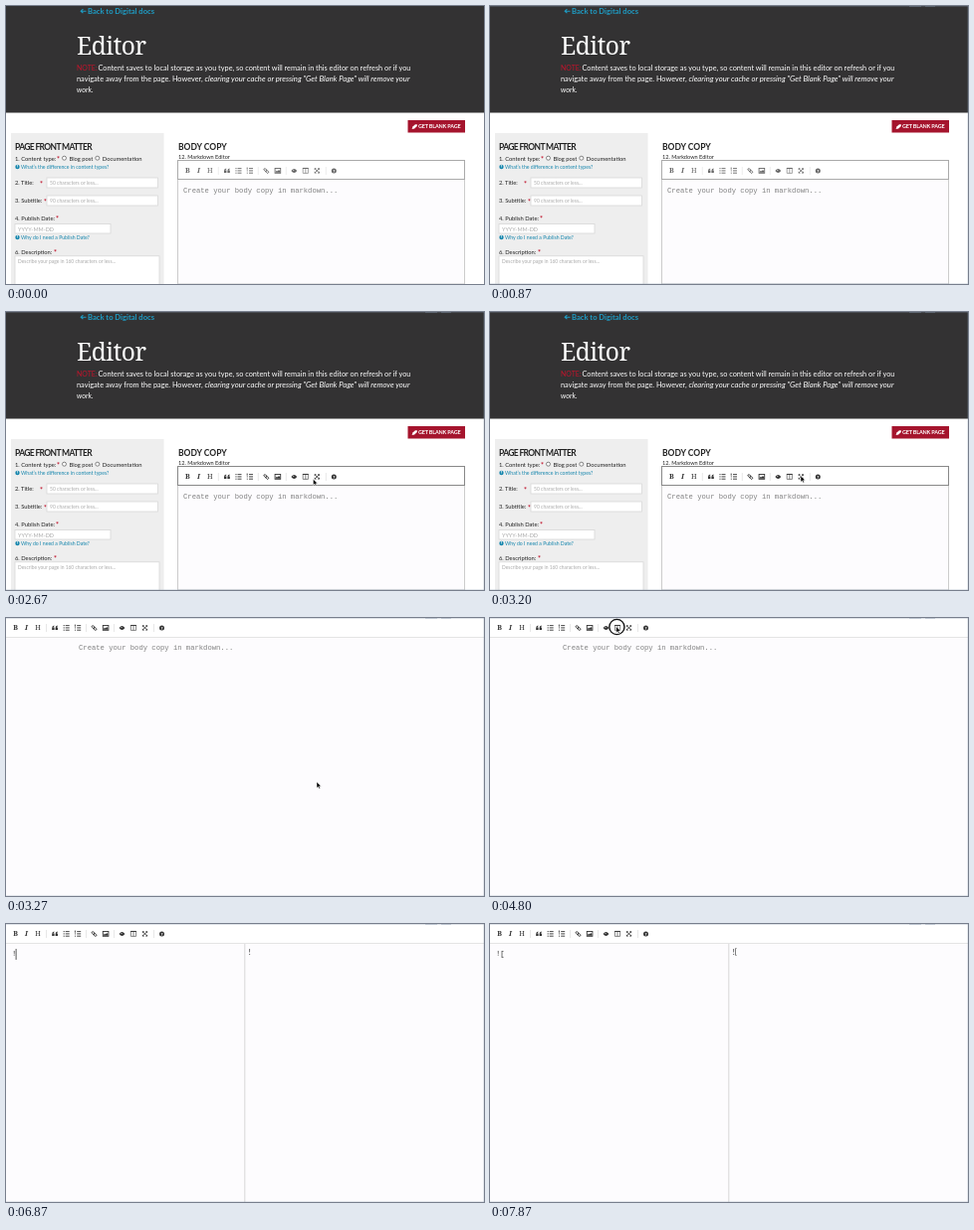
An HTML page for the animation above (8 s loop, 480 px wide and 280 px high).

```html
<!DOCTYPE html>
<html lang="en">
<head>
<meta charset="utf-8">
<title>Markdown editor</title>
<style>
html, body { margin: 0; width: 100%; height: 100%; overflow: hidden; background: #fff; }
svg { display: block; width: 480px; height: 280px; }
text { font-family: Lato, "Open Sans", sans-serif; white-space: pre; }
.mono { font: 7.19px "Liberation Mono", "DejaVu Sans Mono", monospace; fill: #808080; }
.label { font-size: 5.8px; fill: #222; }
.hint { font-size: 5px; fill: #aaa; }
.help { font-size: 5.15px; fill: #1686ad; }
.star { font-size: 7px; font-weight: 700; fill: #c0142c; }
.lead { font-size: 7.34px; fill: #fff; }
.field { fill: #fff; stroke: #d8d8d8; stroke-width: .8; }
.line { fill: none; stroke: #333; stroke-width: .9; }
.serif { font-family: "Noto Serif", "DejaVu Serif", serif; }
</style>
</head>
<body>
<svg viewBox="0 0 480 280">
  <defs>
    <g id="tools" fill="#333">
      <text class="serif" x="9.5" y="12.4" font-size="7" font-weight="700" text-anchor="middle">B</text>
      <text class="serif" x="20.5" y="12.4" font-size="7" font-style="italic" font-weight="600" text-anchor="middle">I</text>
      <text class="serif" x="32" y="12.4" font-size="7" text-anchor="middle">H</text>
      <path d="M46.2 10.2Q46.2 7.6 48.4 7.4V8.4Q47.4 8.7 47.4 9.6H48.6V12H46.2ZM49.6 10.2Q49.6 7.6 51.8 7.4V8.4Q50.8 8.7 50.8 9.6H52V12H49.6Z"/>
      <path class="line" d="M57.6 7.6h1.2M57.6 9.9h1.2M57.6 12.2h1.2M59.7 7.6h4M59.7 9.9h4M59.7 12.2h4"/>
      <path class="line" d="M69.4 6.6v2M69 9.9h1M69 12.2h1M71.2 7.6h4M71.2 9.9h4M71.2 12.2h4"/>
      <g transform="rotate(45 88.5 10)" class="line">
        <rect x="85.6" y="9" width="3.2" height="2" rx="1"/>
        <rect x="88.2" y="9" width="3.2" height="2" rx="1"/>
      </g>
      <rect class="line" x="97.3" y="7.5" width="5.6" height="4.8"/>
      <path d="M98 11.8V10.8L99.2 9.8 99.9 10.4 101.2 8.9 102.3 10.2V11.8Z"/>
      <path d="M113.6 10Q116.5 5.8 119.4 10Q116.5 14.2 113.6 10Z"/>
      <circle cx="116" cy="9.5" r=".5" fill="#fff"/>
      <path d="M125.4 7.4h5.2v5h-5.2zM128 7.4v5" fill="none" stroke="#555" stroke-width=".7"/>
      <path class="line" d="M125.1 7.5h5.8"/>
      <path class="line" d="M137.6 8L141.4 11.8M141.4 8L137.6 11.8"/>
      <path d="M136.9 7.2h2.1l-2.1 2.1zM142.1 7.2v2.1l-2.1-2.1zM136.9 12.6v-2.1l2.1 2.1zM142.1 12.6h-2.1l2.1-2.1z"/>
      <circle cx="156.5" cy="10" r="2.5"/>
      <text x="156.5" y="11.6" font-size="4.4" font-weight="900" fill="#fff" text-anchor="middle">?</text>
      <path d="M40.5 6v8M80.5 6v8M108.5 6v8M148.5 6v8" stroke="#ddd" stroke-width=".7"/>
    </g>
  </defs>

  <g id="page">
    <rect width="480" height="280" fill="#fff"/>
    <rect width="480" height="107.5" fill="#333233"/>
    <path d="M80.5 5.2H75.4M77.4 3.2L75.2 5.2 77.4 7.2" fill="none" stroke="#1f9cc4" stroke-width="1.1"/>
    <text x="82" y="7.7" font-size="7.6" font-weight="700" fill="#1f9cc4">Back to Digital docs</text>
    <text class="serif" x="71" y="49" font-size="24.5" font-weight="300" letter-spacing="-.5" fill="#fff">Editor</text>
    <text x="71" y="65.3" font-size="7" fill="#c0142c">NOTE:</text>
    <text class="lead" x="92.5" y="65.3">Content saves to local storage as you type, so content will remain in this editor on refresh or if you</text>
    <text class="lead" x="71" y="75.9">navigate away from the page. However, <tspan font-style="italic" font-size="7.7">clearing your cache or pressing "Get Blank Page" will remove your</tspan></text>
    <text class="lead" x="71" y="86.7" font-style="italic">work.</text>

    <rect x="403.5" y="115" width="57.5" height="12.5" fill="#a5142d"/>
    <path d="M407.6 124L408.4 121.6 411 119.2H412.8V121L410.2 123.4Z" fill="#fff"/>
    <text x="414" y="123.3" font-size="5.5" font-weight="700" letter-spacing="-.2" fill="#fff">GET BLANK PAGE</text>

    <rect x="5" y="128" width="153.5" height="152" fill="#eee"/>
    <text x="9" y="144.6" font-size="8.5" font-weight="700" letter-spacing="-.65" fill="#222">PAGE FRONT MATTER</text>
    <g id="form"></g>

    <text x="173" y="144.6" font-size="8.5" font-weight="700" fill="#222">BODY COPY</text>
    <text x="173" y="154" font-size="5.6" fill="#222">12. Markdown Editor</text>
    <path d="M172.5 175V280H460.5V175" fill="#fdfcfe" stroke="#ccc"/>
    <rect id="bar" x="172.5" y="155.5" width="288" height="19" fill="#fff"/>
    <use id="pageTools" href="#tools" x="172.8" y="156"/>
    <text class="mono" x="178" y="188">Create your body copy in markdown...</text>
  </g>

  <g id="full">
    <rect width="480" height="280" fill="#fdfcfe"/>
    <rect width="480" height="19" fill="#fff"/>
    <path d="M0 19.5H480" stroke="#e4e4e4"/>
    <use href="#tools"/>
    <path id="divider" d="M239.8 20V280" stroke="#d8d8d8"/>
    <text id="hint" class="mono" y="32">Create your body copy in markdown...</text>
    <text id="typed" class="mono" x="6" y="32.4" style="fill:#222"></text>
    <text id="preview" x="243.8" y="31.2" font-size="7.3" fill="#222"></text>
    <path id="caret" d="M0 25V36" stroke="#444" stroke-width=".9"/>
  </g>

  <g id="edge" fill="none" stroke="#8496a8" stroke-opacity=".35">
    <path d="M0 .4H480" stroke-width=".8"/>
    <path d="M421 .5H433M437 .5H447"/>
    <path d="M479.5 0V280M0 279.5H480" stroke-opacity=".2"/>
  </g>
  <circle id="ring" r="7.6" fill="none" stroke="#111" stroke-width="1.4"/>
  <path id="mouse" d="M0 0V6.2L1.5 4.9 2.5 7.1 3.5 6.6 2.6 4.6H4.5Z" fill="#000" stroke="#fff" stroke-width=".5"/>
</svg>
<script>
const LOOP = 8000, FULL = 3270, SPLIT = 4930, CHAR = 4.315;
const $ = id => document.getElementById(id);

// Front matter form
const text = (cls, x, y, s) => `<text class="${cls}" x="${x}" y="${y}">${s}</text>`;
const label = (y, s, starX) => text('label', 9, y, s) + text('star', starX, y + 1.2, '*');
const field = (x, y, w, h, s, size = 5) =>
  `<rect class="field" x="${x}" y="${y}" width="${w}" height="${h}"/>` +
  `<text class="hint" style="font-size:${size}px" x="${x + 3}" y="${y + 7}">${s}</text>`;
const radio = (x, s) =>
  `<circle cx="${x}" cy="153.2" r="2" fill="#fff" stroke="#555" stroke-width=".7"/>` +
  text('label', x + 5, 155.5, s);
const help = (y, s) =>
  `<circle cx="11.5" cy="${y - 2}" r="2.2" fill="#1686ad"/>` +
  `<text x="11.5" y="${y - .6}" font-size="3.8" font-weight="900" fill="#fff" text-anchor="middle">?</text>` +
  text('help', 15, y, s);

$('form').innerHTML =
  label(155.5, '1. Content type:', 51) + radio(58.5, 'Blog post') + radio(91.8, 'Documentation') +
  help(164, 'What’s the difference in content types?') +
  label(180.3, '2. Title:', 34) + field(41, 173, 111.5, 10, '50 characters or less...') +
  label(198.4, '3. Subtitle:', 38) + field(41, 191, 111.5, 10, '90 characters or less...') +
  label(216, '4. Publish Date:', 50) + field(9, 219.5, 96, 9.5, 'YYYY-MM-DD', 5.5) +
  help(235, 'Why do I need a Publish Date?') +
  label(250, '6. Description:', 48) +
  field(9, 251.8, 145, 40, 'Describe your page in 160 characters or less...', 4.9);

// Pointer stops: time, x, y
const stops = [
  [1000, 430, 236], [1930, 301.8, 174], [2250, 301.8, 174], [2950, 312, 165],
  [3870, 312, 165], [4600, 126.7, 8.5], [5200, 126.7, 8.5],
  [5530, 82, 38], [5800, 52, 26.5], [LOOP, 52, 26.5]
];
const ease = p => p * p * (3 - 2 * p);

function pointer(t) {
  const i = Math.max(1, stops.findIndex(s => s[0] > t));
  const [t0, x0, y0] = stops[i - 1], [t1, x1, y1] = stops[i];
  const p = ease(Math.max(0, (t - t0) / (t1 - t0)));
  return [x0 + (x1 - x0) * p, y0 + (y1 - y0) * p];
}

const within = (t, a, b) => t >= a && t < b;
const show = (id, on) => $(id).setAttribute('visibility', on ? 'visible' : 'hidden');
const place = (id, x, y) => $(id).setAttribute('transform', `translate(${x} ${y})`);

function draw(t) {
  const full = t >= FULL, split = t >= SPLIT;
  const typed = t < 6600 ? '' : t < 7270 ? '!' : '![';
  const [x, y] = pointer(t);

  show('page', !full);
  show('full', full);
  show('edge', t >= 70);
  show('divider', split);

  const hover = within(t, 1930, FULL);
  $('bar').setAttribute('stroke', hover ? '#888' : '#aaa');
  $('pageTools').setAttribute('opacity', hover ? 1 : .75);

  show('hint', full && !typed);
  $('hint').setAttribute('x', split ? 6 : 73);
  $('typed').textContent = $('preview').textContent = typed;
  show('caret', within(t, 5800, 6270) || within(t, 6600, 7600));
  place('caret', 5.8 + typed.length * CHAR, 0);

  show('mouse', within(t, 1000, 6600));
  place('mouse', x, y);
  show('ring', within(t, 3070, 3140) || within(t, 4730, SPLIT));
  place('ring', x + .7, y + .5);
}

const start = performance.now();
function tick(now) {
  draw(Math.max(0, now - start) % LOOP);
  requestAnimationFrame(tick);
}
draw(0);
requestAnimationFrame(tick);
</script>
</body>
</html>
```
